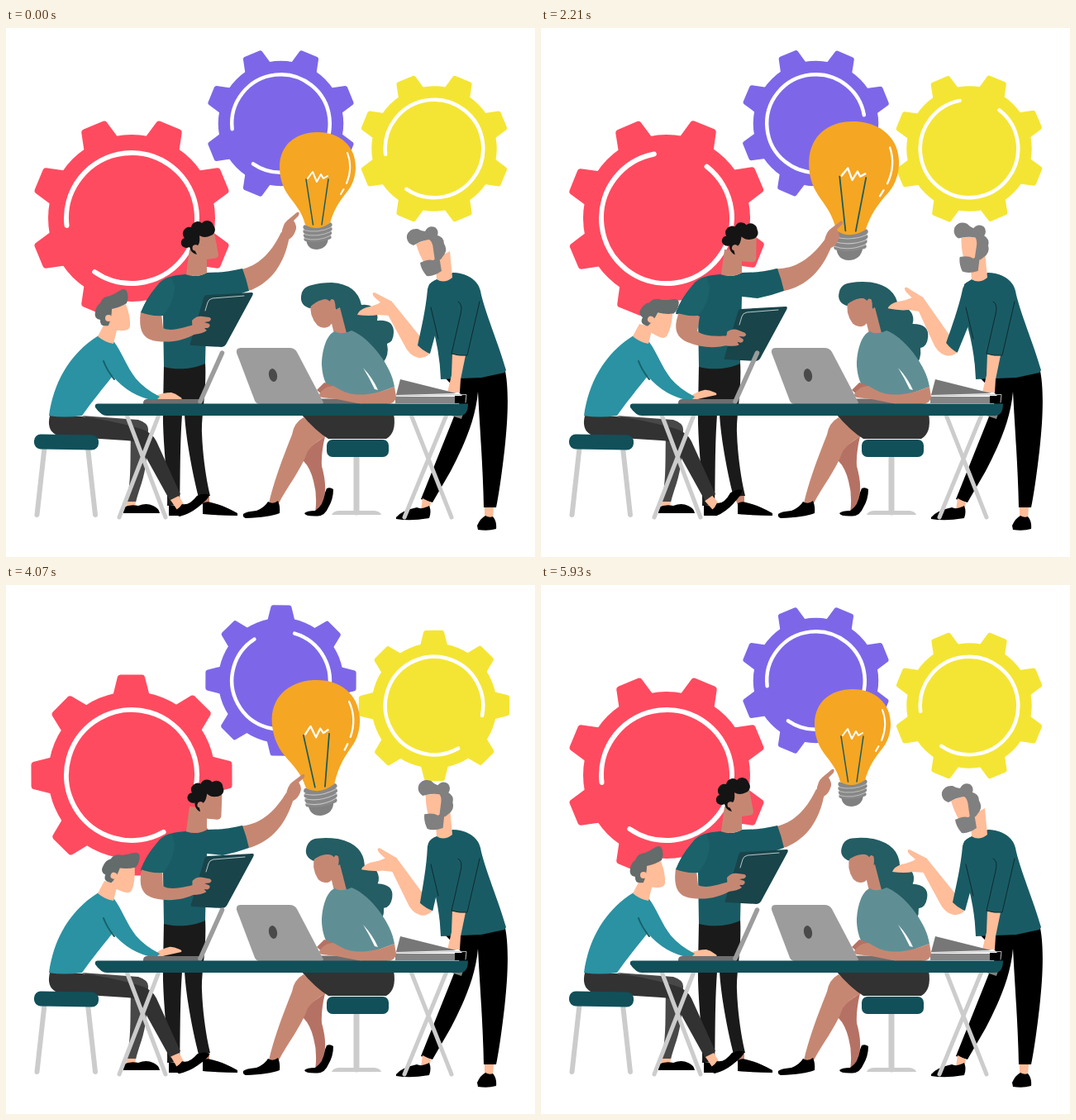
Animation of 640 by 640 pixels, one loop 6 s. Source, as an HTML page:

```html
<!DOCTYPE html>
<html lang="en">
<head>
<meta charset="utf-8">
<title>Team idea</title>
<style>
html, body { margin: 0; width: 100%; height: 100%; overflow: hidden; background: #fff; }
svg { display: block; width: 100%; height: 100%; }

.teal { fill: #195b64; }
.dark { fill: #115059; }
.tan { fill: #c68772; }
.tan2 { fill: #b57264; }
.pale { fill: #ffbd9a; }
.pants { fill: #323232; }
.grey { fill: #808080; }
.line { fill: none; stroke-linecap: round; stroke-linejoin: round; }
.leg { stroke: #ccc; stroke-width: 5; }
.seam { stroke: #0d2b30; stroke-width: 1; }

/* Motion runs in 83 even steps, then rests for one; the lead keeps step edges clear of rounding. */
.cw, .ccw, .bulb, .sway, .tablet { animation: 6s -30ms infinite; }
.cw, .ccw { animation-name: turn; }
.cw { --turn: 360deg; }
.ccw { --turn: -360deg; }
@keyframes turn {
  0% { rotate: 0deg; animation-timing-function: steps(83); }
  98.83%, 100% { rotate: var(--turn); }
}

.bulb { transform-origin: 376.5px 197px; animation-name: glow; }
@keyframes glow {
  0% { rotate: 0deg; scale: 1; animation-timing-function: steps(21); }
  25% { rotate: 5deg; scale: 1.125; animation-timing-function: steps(21); }
  50% { rotate: 0deg; scale: 1.25; animation-timing-function: steps(20); }
  73.83% { rotate: -5deg; scale: 1.125; animation-timing-function: steps(21); }
  98.83%, 100% { rotate: 0deg; scale: 1; }
}

.sway { animation-name: sway; }
@keyframes sway {
  0% { rotate: 0deg; animation-timing-function: steps(11); }
  13.17% { rotate: var(--a); animation-timing-function: steps(20); }
  36.83% { rotate: var(--b); animation-timing-function: steps(11); }
  50% { rotate: var(--c); animation-timing-function: steps(4); }
  54.83% { rotate: var(--d); animation-timing-function: steps(11); }
  67.83% { rotate: var(--e); animation-timing-function: steps(16); }
  86.83% { rotate: var(--f); animation-timing-function: steps(10); }
  98.83%, 100% { rotate: var(--z, 0deg); }
}
.tablet { animation-name: lower; }
@keyframes lower {
  0% { translate: 0 0; animation-timing-function: steps(11); }
  13.17% { translate: 0 5.5px; animation-timing-function: steps(20); }
  36.83% { translate: -1px 17px; animation-timing-function: steps(15); }
  54.83% { translate: 0 10.5px; animation-timing-function: steps(11); }
  67.83% { translate: 1px 5px; animation-timing-function: steps(16); }
  86.83% { translate: 0 1px; animation-timing-function: steps(10); }
  98.83%, 100% { translate: 0 0; }
}

.point { transform-origin: 290px 304px; --a: 5deg; --b: 11deg; --c: 13deg; --d: 12.5deg; --e: 6deg; --f: .5deg; }
.finger { transform-origin: 338px 251px; --a: -24deg; --b: -8.6deg; --c: 4deg; --d: 7.5deg; --e: -3deg; --f: 0deg; }
.holder { transform-origin: 175px 362px; --a: 5deg; --b: 15deg; --c: 11deg; --d: 9deg; --e: 4.5deg; --f: 1deg; }
.nod1 { transform-origin: 232px 292px; --a: 7deg; --b: 12deg; --c: 13deg; --d: 13deg; --e: 13deg; --f: 7deg; }
.nod2 { transform-origin: 125px 372px; --a: 9deg; --b: 25deg; --c: 27deg; --d: 26deg; --e: 18deg; --f: 6deg; }
.nod3 { transform-origin: 403px 362px; --a: 1.5deg; --b: 5deg; --c: 7deg; --d: 7.5deg; --e: 9deg; --f: 9.5deg; --z: 9.5deg; }
.nod4 { transform-origin: 528px 300px; --a: 6.5deg; --b: 16.5deg; --c: 17deg; --d: 16.5deg; --e: 15.5deg; --f: 6deg; }
.type { transform-origin: 184px 447px; --a: -12deg; --b: -12deg; --c: -12deg; --d: -12deg; --e: -12deg; --f: -12deg; }
.tap { transform-origin: 207px 577px; --a: -6deg; --b: -9deg; --c: -2deg; --d: 0deg; --e: 3deg; --f: 0deg; }
.raise { transform-origin: 518px 318px; --a: 4deg; --b: 7deg; --c: 0deg; --d: -2deg; --e: -2.5deg; --f: -1.5deg; }
.offer { transform-origin: 502px 388px; --a: -3deg; --b: -3deg; --c: 2deg; --d: 4deg; --e: 5deg; --f: 4deg; }
</style>
</head>
<body>
<svg viewBox="0 0 640 640">
  <defs>
    <path id="tooth" d="M-22 -97 L-16.5 -119 Q-15.5 -121.5 -13 -121.5 H13 Q15.5 -121.5 16.5 -119 L22 -97Z"/>
    <g id="pair">
      <use href="#tooth" transform="rotate(22.5)"/>
      <use href="#tooth" transform="rotate(67.5)"/>
    </g>
    <g id="gear">
      <circle r="101"/>
      <use href="#pair"/>
      <use href="#pair" transform="rotate(90)"/>
      <use href="#pair" transform="rotate(180)"/>
      <use href="#pair" transform="rotate(270)"/>
      <circle class="line" r="79" pathLength="360" stroke="#fff" stroke-width="6" stroke-dasharray="311 49" transform="rotate(173.5)"/>
    </g>
  </defs>

  <!-- gears -->
  <g transform="translate(152 230)" fill="#ff4b60"><use href="#gear" class="cw"/></g>
  <g transform="translate(332.5 115.5) scale(.75)" fill="#7d67e8"><use href="#gear" class="ccw"/></g>
  <g transform="translate(518 146) scale(.75)" fill="#f4e534"><use href="#gear" class="cw"/></g>

  <!-- bulb -->
  <g class="bulb">
    <path class="grey" d="M363 255 Q364 268 376 268 Q389 267 390 254Z"/>
    <path class="line" stroke="#888" stroke-width="5.2" d="M362 241 Q377 244 392 238 M362 246 Q377 249 392 243 M362.5 251 Q377 254 391.5 248 M363 255.5 Q377 258 391 253"/>
    <path class="line" stroke="#c4c4c4" stroke-width=".9" d="M360 244.5 Q377 249 394 241 M360 249.5 Q377 254 394 246 M361 254.5 Q377 259 393 251"/>
    <path fill="#f5a623" d="M362 238 C358 222 350 214 342 203 C334 192 331 180 331 168 C331 142 350 126 377 126 C404 126 423 143 423 168 C423 180 419 191 412 199 C402 211 396 222 392 236 Q376 247 362 238Z"/>
    <path class="line" stroke="#1d5a5a" stroke-width="1.5" d="M363 183 L371.5 238 M390 183 L382 238"/>
    <path class="line" stroke="#fff" stroke-width="2" d="M365 182 L371 174 L376 186 L381 177 L384 182 L389 179 M413 151 Q420 169 412 188 M408.5 195 L405 201"/>
  </g>

  <!-- standing man with tablet -->
  <g>
    <path fill="#1a1a1a" d="M191 407 L241 404 C243 440 236 470 237 490 C238 520 243 550 247 566 L233 568 C226 540 218 500 216 468 L213 468 C210 510 211 550 210 577 L195 578 C196 545 189 500 190 460Z"/>
    <path class="tan" d="M234 567 L246 566 L246 577 L238 577Z"/>
    <path d="M238 575 Q243 572 248 574 Q262 577 280 587 L280 590 Q258 590 238 588Z M197 577 L212 579 L213 590 L197 590Z"/>
    <g class="sway point">
      <path class="tan" d="M280 293 C304 289 320 274 333 247 L343 252 C337 285 322 306 297 317 L284 319Z"/>
      <path class="tan sway finger" d="M333 250 Q335 237 340 233 L352 223 Q356 222 354 227 L348 233 Q353 240 350 246 Q347 254 341 256Z"/>
    </g>
    <path class="teal" d="M217 298 C203 299 194 301 186 308 C176 320 168 330 163 346 L190 348 L191 410 C206 414 226 413 241 406 L243 325 L262 327 Q278 324 294 318 Q291 304 286 291 C270 295 255 296 243 296 Q231 303 217 298Z"/>
    <path class="tan" d="M222 268 L218 298 Q231 303 243 296 L243 270Z"/>
    <g class="sway nod1">
      <path class="tan" d="M226 254 L252 248 L257 274 Q257 279 250 279 L236 281 Q228 274 226 254Z"/>
      <path fill="#141414" d="M215 265 a6 6 0 0 1 1 -11 a8 8 0 0 1 8 -13 a8 8 0 0 1 13 -5 a8 8 0 0 1 14 3 a7.5 7.5 0 0 1 -3 12 Q240 255 234 251 Q235 260 232 263 Q229 261 226 264 L231 274 Q224 273 222 265 Q218 267 215 265Z"/>
      <circle class="tan" cx="229" cy="266" r="3.5"/>
    </g>
    <g class="tablet">
      <path fill="#18444a" d="M243 323 L297 320 Q300 320 298 324 L266 383 Q264 386 261 386 L224 384 Q222 384 223 381 L239 327 Q240 323 243 323Z"/>
      <path class="line" stroke="#b8c8ca" stroke-width="1" d="M241 342 L244 332 Q245 328 250 327 L288 324"/>
    </g>
    <g class="sway holder">
      <path class="tan" d="M163 343 C160 365 165 377 183 379 C200 381 216 378 231 369 L227 359 C216 362 200 368 190 363 L188 345Z"/>
      <path class="tan" d="M225 354 Q230 348 238 349 L246 350 Q250 352 246 355 L240 356 L246 358 Q248 361 244 363 L240 363 L243 366 Q238 370 226 371Z"/>
    </g>
    <path fill="#1b626b" d="M200 301 Q190 302 183 312 Q170 327 163 344 Q175 349 190 348 Q204 332 204 312Z"/>
  </g>

  <!-- stool and seated man -->
  <path class="line leg" style="stroke-width:6" d="M46.5 508 L37.5 589 M99 508 L108 589"/>
  <path fill="#484848" d="M92 469 L160 474 Q173 478 172 487 L170 520 C168 545 160 560 157 574 L146 573 C152 545 150 520 151 495Z"/>
  <path class="pants" d="M53 469 L92 470 Q120 473 160 484 Q176 488 182 500 L211 564 L199 573 L162 506 Q157 499 145 499 L66 494 Q48 490 53 469Z"/>
  <rect class="dark" x="34" y="492" width="78" height="18" rx="8" transform="rotate(1 73 501)"/>
  <path class="pale" d="M146 573 L157 573 L156 580 L145 580Z"/>
  <path d="M142 587 V580 Q150 576 160 578 Q170 574 178 578 Q185 581 186 587Z"/>
  <g class="sway tap">
    <path class="pale" d="M199 571 L209 566 L215 576 L207 583Z"/>
    <path d="M206 583 Q204 589 210 591 Q222 588 232 580 Q245 570 246 565 Q240 562 231 566 Q222 578 213 576 Q210 581 206 583Z"/>
  </g>
  <path class="pale sway type" d="M181 445 Q190 441 200 441 Q205 442 210 446 Q214 448 212 450 L190 450 L182 452Z"/>
  <path fill="#2a92a2" d="M52 469 C57 432 75 395 112 372 Q120 379 131 380 C140 392 146 410 157 424 Q168 437 186 446 L181 451 Q150 446 129 421 C118 435 104 452 92 469 Q70 472 52 469Z"/>
  <path class="line" stroke="#17616b" stroke-width="2" d="M118 403 Q122 414 131 425"/>
  <path class="pale" d="M119 358 L111 373 Q119 380 130 382 L135 362Z"/>
  <g class="sway nod2">
    <path class="pale" d="M120 342 L145 334 Q151 350 150 361 Q149 367 138 366 L126 365Z"/>
    <path fill="#636b6b" d="M124 360 Q113 362 114 353 Q106 352 108 343 Q109 336 114 333 Q116 325 126 324 Q133 321 137 318 Q143 314 146 318 Q149 326 146 333 Q138 338 128 340 Q128 350 124 360Z"/>
    <circle class="pale" cx="124" cy="351" r="4"/>
  </g>

  <!-- seated woman -->
  <path class="line" stroke="#ccc" stroke-width="7" d="M424 518 V586"/>
  <path fill="#ccc" d="M394 589 Q396 584 404 584 H446 Q453 585 454 589Z"/>
  <path class="tan2" d="M360 512 L386 494 Q381 515 382 530 Q387 548 386 560 L384 580 L374 587 Q377 566 372 548 Q368 532 360 524Z"/>
  <path class="tan" d="M360 471 Q348 478 346 492 C335 520 325 545 318 575 L329 577 C340 555 357 535 365 512 Q372 502 387 494Z"/>
  <path d="M287 588 Q290 585 303 584 Q313 580 317 573 Q323 577 329 572 Q332 579 331 587 Q318 592 290 593 Q286 592 287 588Z"/>
  <path d="M361 587 Q364 584 374 584 Q384 578 386 562 L388 557 Q392 555 396 558 Q396 570 390 580 Q386 590 377 590.5 Q362 591 361 587Z"/>
  <path class="pants" d="M356 466 H469 Q473 490 460 497 H390 Q375 488 356 466Z"/>
  <rect class="dark" x="388" y="498" width="75" height="21" rx="7"/>
  <path class="sway nod3" fill="#245d63" d="M368 339 Q356 336 357 325 Q358 313 370 311 Q380 308 394 308 Q425 310 430 335 Q445 333 449 346 Q450 350 449 354 Q469 352 469 368 Q469 380 461 382 Q464 396 456 405 Q440 385 425 372 L400 366 Q402 350 396 330Z"/>
  <path class="tan" d="M391 345 L397 370 Q404 374 412 369 L404 338Z"/>
  <path fill="#5f8f95" d="M398 367 C388 370 382 390 382 408 C383 425 388 435 398 446 L440 445 L470 434 C467 410 441 375 418 366 Q405 372 398 367Z"/>
  <path fill="#fff" d="M432 411 Q444 424 450 438 L446 437 Q440 424 432 411Z"/>
  <g class="sway nod3">
    <path class="tan" d="M369 333 Q366 348 377 360 Q384 365 391 361 L400 351 L397 329 Q382 326 369 333Z"/>
    <path fill="#245d63" d="M366 339 L370 322 L392 322 L394 333 Q388 326 382 329 Q376 330 366 339Z"/>
    <ellipse class="tan" cx="394.5" cy="337" rx="4" ry="9"/>
  </g>
  <path class="tan2" d="M376 438 L385 429 Q395 431 405 440 L384 445Z"/>

  <!-- man with raised hand -->
  <path d="M530 422 L604 415 C609 440 607 480 602 520 C599 545 596 565 593 580 L578 580 C577 530 573 480 571 440 C568 475 553 507 538 536 L516 574 L502 570 Q522 520 542 470 L552 445Z"/>
  <path class="pale" d="M504 569 L514 574 L512 584 L502 583Z M579 580 L590 580 L589 593 L579 593Z"/>
  <path d="M472 592 Q478 584 497 580 Q503 583 512 578 Q515 585 512 593 Q490 597 472 594Z M570 602 Q574 593 580 590 Q585 593 589 591 Q594 597 593 606 Q583 609 571 607Z"/>
  <path class="teal" d="M521 304 Q530 308 540 296 C556 296 571 304 574 318 C578 340 597 385 605 414 L603 417 L575 423 L526 425 Q525 390 513 350 L512 310Z"/>
  <g class="sway raise">
    <g class="sway offer">
      <path class="pale" d="M466 330 L500 372 L513 393 Q508 400 499 399 Q488 397 481 382 L462 347Z"/>
      <path class="pale" d="M467 331 L446 320 Q441 320 446 326 L453 332 Q446 336 436 338 Q427 341 425 347 Q440 349 450 347 L464 348Z"/>
    </g>
    <path class="teal" d="M523 304 Q512 306 510 316 C508 340 502 365 498 384 Q505 391 513 394 L525 350 L530 310Z"/>
  </g>
  <path class="line seam" d="M514 338 L523 376"/>
  <path class="pale" d="M540 394 L556 396 L550 425 L549 441 L534 441 L539 420Z"/>
  <path class="teal" d="M550 345 L539 394 Q548 397 558 396 L572 340Z"/>
  <path class="line seam" d="M547 331 Q553 334 550 346 L539 394 Q548 397 558 396 L573 331"/>
  <path class="pale" d="M519 280 L521 304 Q530 310 540 302 L537 270Z"/>
  <g class="sway nod4">
    <path class="pale" d="M496 261 L515 254 L523 282 L507 286 Q500 275 496 261Z"/>
    <path class="grey" d="M501 284 Q510 279 517 281 L524 276 L527 294 Q517 301 509 300 Q502 292 501 284Z"/>
    <path class="grey" d="M493 263 Q484 260 485 251 Q488 242 498 243 Q503 246 507 246 Q511 238 519 241 Q524 245 522 251 Q530 253 530 261 Q534 267 531 273 L526 280 L519 282 L517 268 Q516 258 512 256 Q503 257 493 263Z"/>
  </g>

  <!-- desk -->
  <path class="line leg" d="M146 468 L193 592 M185 468 L137 592 M490 468 L539 592 M533 468 L482 592"/>
  <path class="grey" d="M533 467 H553 L551 473Z"/>
  <path fill="#777" d="M477 425 L545 442 L472 444Z"/>
  <rect fill="#858585" x="471" y="446" width="73" height="8"/>
  <rect x="543" y="445" width="13" height="9"/>
  <path class="line" stroke="#bbb" stroke-width="1" d="M471 445 L557 443.5 L556 453"/>
  <path fill="#6e6e6e" d="M166 454 Q166 449 171 449 H236 V455 H166Z"/>
  <path class="line" stroke="#9c9c9c" stroke-width="5.5" d="M235 452 L261.5 393"/>
  <rect fill="#6e6e6e" x="375" y="448.5" width="54" height="7" rx="3"/>
  <path class="tan" d="M470 434 L472 446 Q471 455 460 455 L430 455 L400 449 L382 447 Q376 445 382 439 Q388 433 396 433 L405 438 C420 446 440 446 470 434Z"/>
  <path fill="#9c9c9c" d="M284 387 H343 Q349 387 352 392 L384 453 Q384 455 380 455 H307 Q303 455 301 451 L279 393 Q278 387 284 387Z"/>
  <ellipse fill="#4a4a4a" cx="323" cy="420" rx="5" ry="8" transform="rotate(-12 323 420)"/>
  <path class="dark" d="M111 454.500 H559 Q559 469 549 469 H122 Q115 469 108 459 Q107 454.500 111 454.500Z"/>
</svg>
</body>
</html>
```
